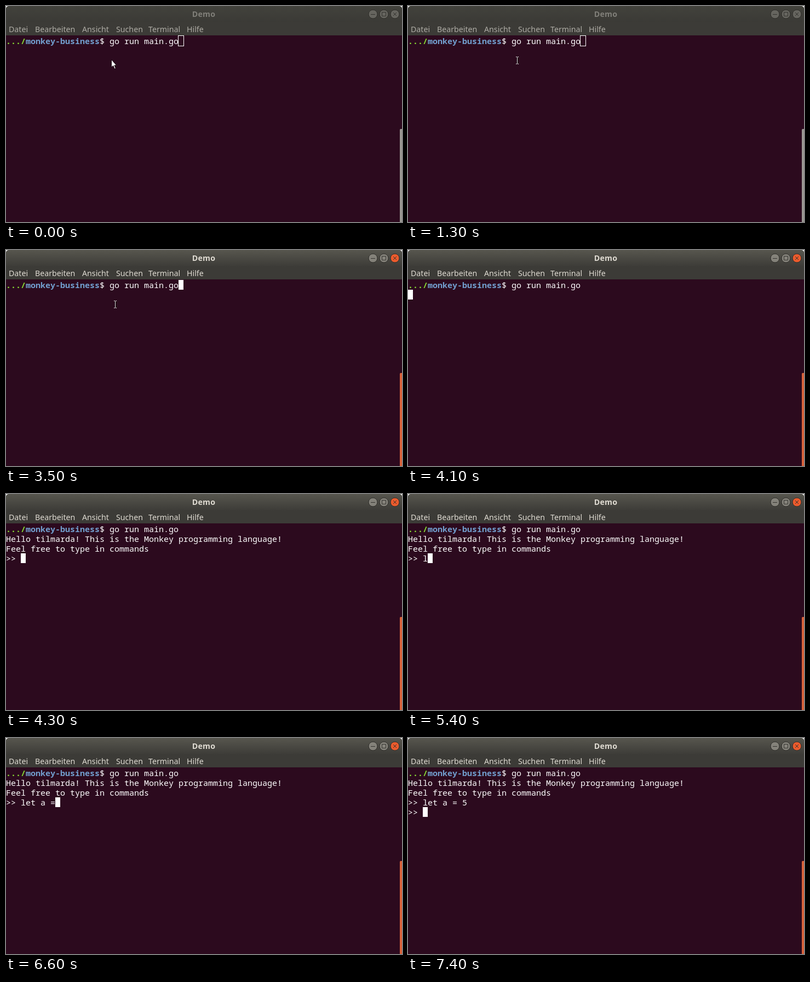
Animation of 723x397 px, one loop 8 s. Source, as an HTML page:

```html
<!DOCTYPE html>
<html lang="de">
<head>
<meta charset="utf-8">
<title>Demo</title>
<style>
  html, body { margin: 0; width: 100%; height: 100%; overflow: hidden; background: #fff; }
  svg { display: block; width: 723px; height: 397px; }
  text { white-space: pre; }
  .ui { font: 14.2px "Noto Sans", "Open Sans", sans-serif; fill: #aeaca5; }
  .title { font-weight: 700; fill: #807f79; text-anchor: middle; letter-spacing: .2px; }
  .term { font: 15px "Noto Sans Mono", "DejaVu Sans Mono", monospace; fill: #fff; }
  .bold { font-weight: 700; }
  .button { fill: #66655f; stroke: #2f2e2a; }
  .glyph { fill: none; stroke: #33322e; }
  #scrollbar { fill: #9a9692; }
  #bar { fill: url(#dim); }
  .focused .ui { fill: #dfdbd2; }
  .focused #bar { fill: url(#lit); }
  .focused .button { fill: #84827a; }
  .focused .close { fill: #ec5b2d; }
  .focused #scrollbar { fill: #d9623b; }
</style>
</head>
<body>
<svg id="stage" width="723" height="397" viewBox="0 0 723 397">
  <defs>
    <linearGradient id="dim" x2="0" y2="1">
      <stop stop-color="#42423c"/><stop offset="1" stop-color="#3b3a36"/>
    </linearGradient>
    <linearGradient id="lit" x2="0" y2="1">
      <stop stop-color="#57564e"/><stop offset="1" stop-color="#3d3c38"/>
    </linearGradient>
  </defs>

  <path fill="#3c3b37" d="M0 54V6Q0 0 6 0H717Q723 0 723 6V54Z"/>
  <path id="bar" d="M0 30V6Q0 0 6 0H717Q723 0 723 6V30Z"/>
  <text class="ui title" x="361" y="20">Demo</text>
  <g id="menu"></g>

  <circle class="button" cx="670" cy="15" r="8"/>
  <circle class="button" cx="690" cy="15" r="8"/>
  <circle class="button close" cx="710" cy="15" r="8"/>
  <path class="glyph" d="M666 15.5H674M686.5 11.5H693.5V18.5H686.5ZM707 12L713 18M713 12L707 18"/>

  <rect y="54" width="723" height="343" fill="#2c0a1e"/>
  <path id="scrollbar" d="M719 397V227.5Q719 226 720.5 226H723V397Z"/>

  <text class="term" x="0" y="70"><tspan class="bold" fill="#8ae234">.../</tspan><tspan class="bold" fill="#729fcf">monkey-business</tspan>$ go run main.go</text>
  <g id="output"></g>
  <rect id="cursor"/>

  <path id="arrow" fill="#fff" stroke="#16050f" d="M192.5 98.5V112.7L195.7 109.7L198.2 115.5L200.3 114.6L197.9 109H201.7Z"/>
  <g id="beam" fill="none">
    <path stroke="#16050f" stroke-width="3" d="M2.5 1V13"/>
    <path stroke="#e8e4e6" d="M0 .5H2M3 .5H5M2.5 1V13M0 13.5H2M3 13.5H5"/>
  </g>
</svg>

<script>
  const LOOP = 8000, CELL = 9, LINE = 18, TOP = 55;
  const $ = id => document.getElementById(id);

  const greeting = ['Hello tilmarda! This is the Monkey programming language!',
                    'Feel free to type in commands'];
  const command = 'let a = 5';
  const typing = n => ({
    lines: [...greeting, '>> ' + command.slice(0, n)],
    cursor: [3 + n, 3], visible: true
  });

  // Each step changes only the listed parts of the state.
  const steps = [
    [0, { focused: false, block: false, visible: true, cursor: [35, 0], lines: [], pointer: 'arrow', beam: [0, 0] }],
    [100, { pointer: 'beam', beam: [192, 93] }],
    [1000, { beam: [191, 94] }],
    [1200, { beam: [194, 94] }],
    [1300, { beam: [197, 93] }],
    [3400, { block: true }],
    [3500, { focused: true }],
    [4000, { pointer: 'none' }],
    [4100, { cursor: [0, 1] }],
    [4300, typing(0)],
    [4600, { visible: false }],
    [5300, { visible: true }],
    ...[5400, 5500, 5700, 5800, 5900, 6200, 6600, 6800, 7100].map((t, i) => [t, typing(i + 1)]),
    [7400, { lines: [...greeting, '>> ' + command, '>> '], cursor: [3, 4] }]
  ];

  let state = {};
  const timeline = steps.map(([time, change]) => ({ time, state: state = { ...state, ...change } }));

  function addText(parent, className, x, y, content = '') {
    const text = document.createElementNS('http://www.w3.org/2000/svg', 'text');
    text.setAttribute('class', className);
    text.setAttribute('x', x);
    text.setAttribute('y', y);
    text.textContent = content;
    parent.append(text);
    return text;
  }

  function setAttributes(element, attributes) {
    for (const name in attributes) element.setAttribute(name, attributes[name]);
  }

  [['Datei', 5], ['Bearbeiten', 53], ['Ansicht', 139], ['Suchen', 201], ['Terminal', 260], ['Hilfe', 330]]
    .forEach(([label, x]) => addText($('menu'), 'ui', x, 48, label));
  const rows = [1, 2, 3, 4].map(row => addText($('output'), 'term', 0, TOP + row * LINE + 15));

  function draw({ focused, block, visible, cursor: [column, row], lines, pointer, beam }) {
    $('stage').classList.toggle('focused', focused);
    rows.forEach((text, i) => text.textContent = lines[i] || '');

    const grow = block ? 0 : 0.5;
    setAttributes($('cursor'), {
      x: column * CELL - grow, y: TOP + row * LINE - grow,
      width: CELL + 2 * grow, height: LINE + 2 * grow,
      fill: block ? '#fff' : 'none', stroke: block ? 'none' : '#fff',
      visibility: visible ? 'visible' : 'hidden'
    });

    $('arrow').setAttribute('visibility', pointer === 'arrow' ? 'visible' : 'hidden');
    setAttributes($('beam'), {
      visibility: pointer === 'beam' ? 'visible' : 'hidden',
      transform: `translate(${beam})`
    });
  }

  let shown;
  const start = performance.now();
  function tick() {
    const time = (performance.now() - start) % LOOP;
    const current = timeline.findLast(step => step.time <= time).state;
    if (current !== shown) draw(shown = current);
    requestAnimationFrame(tick);
  }
  tick();
</script>
</body>
</html>
```
